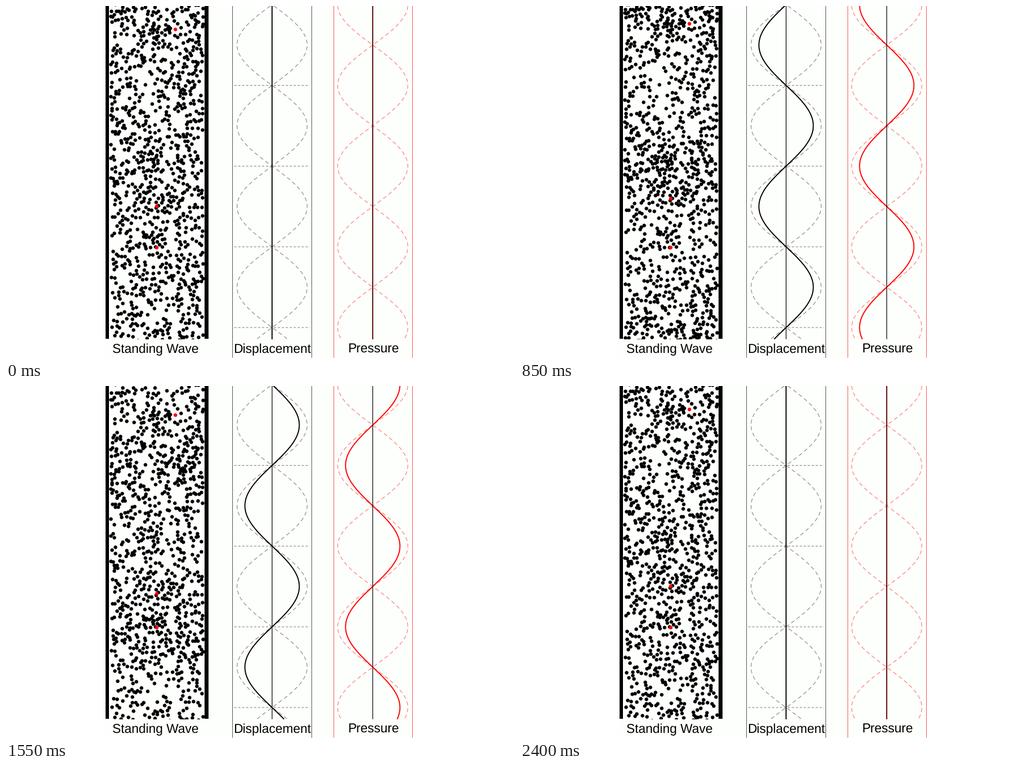
A matplotlib script for the animation above (2.45 s loop, 898 px wide and 623 px high).

```python
import matplotlib.pyplot as plt
import numpy as np
from matplotlib.animation import FuncAnimation
from matplotlib.patches import Rectangle

W, H, DPI = 898, 623, 64
PX = 72 / DPI                 # points per pixel
FRAMES, INTERVAL = 49, 50
PERIOD = 48                   # frames per oscillation

BOTTOM = 589                  # lower end of tube and graphs
HALF = 142.85                 # half a wavelength
NODE = 140.5                  # a displacement node
SWING = 16.2                  # largest particle shift
ENVELOPE, PEAK = 62, 60.6     # dashed and solid graph amplitudes
DISP_X, PRES_X = 470.4, 648.3
GREY, PINK, PAPER = "#777777", "#ff6464", "#fdfffc"

plt.rcParams["text.hinting"] = "none"
fig = plt.figure(figsize=(W / DPI, H / DPI), dpi=DPI, facecolor="white")
ax = fig.add_axes([0, 0, 1, 1])
ax.set_xlim(0, W)
ax.set_ylim(H, 0)
ax.axis("off")
window = Rectangle((0, 0), W, BOTTOM, transform=ax.transData)


def box(x, y, w, h, color):
    ax.add_patch(Rectangle((x, y), w, h, fc=color, lw=0))


def line(x, y, color, width, z):
    artist, = ax.plot(x, y, color=color, lw=width * PX, zorder=z, snap=False)
    return artist


def displacement(y):
    return np.sin(np.pi * (y - NODE) / HALF)


def pressure(y):
    return np.cos(np.pi * (y - NODE) / HALF)


def make_particles(count, gap=3.5):
    """Scatter rest positions over the tube, leaving a few sparse spots."""
    rng = np.random.default_rng(5)
    spots = [(290, 264, 12), (216, 346, 10), (205, 411, 10),
             (290, 405, 10), (205, 483, 11)]
    points = [(281, 42), (285, 40), (288, 43), (267, 408), (267, 417), (271, 422)]
    while len(points) < count:
        x, y = rng.uniform(184.5, 348), rng.uniform(-20, 610)
        sparse = any(np.hypot(x - a, y - b) < r for a, b, r in spots)
        nearest = np.hypot(*(np.array(points) - (x, y)).T).min()
        if not sparse and nearest > gap:
            points.append((x, y))
    return np.array(points)


def scatter(points, color, z):
    dots = ax.scatter(points[:, 0], points[:, 1], s=(6.4 * PX) ** 2,
                      c=color, linewidths=0, zorder=z)
    dots.set_clip_path(window)
    return dots


def graph(center, shape, envelope, edge, left, right):
    """Draw the fixed parts of one graph."""
    for x in (left + 0.5, right - 0.5):
        line([x, x], [0, H - 1], edge, 1, 2)
    line([center, center], [0, BOTTOM], "#111111", 1.3, 6)
    for sign in (-1, 1):
        curve = line(center + sign * ENVELOPE * shape(ys), ys, envelope, 1, 3)
        curve.set_dashes((7, 5))


ys = np.linspace(0, BOTTOM, 400)
box(173, 0, 546, H, PAPER)

# tube
box(176, 0, 5.5, BOTTOM, "black")
box(351, 0, 7, BOTTOM, "black")
particles = make_particles(1070)
tracers = np.array([(298.5, 41), (266.3, 354.3), (266.3, 427)])
groups = [(particles, scatter(particles, "black", 2)),
          (tracers, scatter(tracers, "red", 3))]

# graphs
graph(DISP_X, displacement, GREY, "#555555", 400, 541)
graph(PRES_X, pressure, PINK, "#ff5555", 579, 719)
for k in range(4):
    y = NODE + k * HALF
    line([403.5, 537], [y, y], GREY, 1, 3).set_dashes((4, 3))
disp_wave = line(DISP_X + 0 * ys, ys, "black", 1.9, 5)
pres_wave = line(PRES_X + 0 * ys, ys, "red", 1.9, 5)

for x, label in ((264.2, "Standing Wave"), (470.2, "Displacement"), (649.7, "Pressure")):
    ax.text(x, 614, label, family="Liberation Sans", fontsize=22.6 * PX,
            ha="center", va="baseline", color="black")


def update(i):
    s = np.sin(2 * np.pi * i / PERIOD)
    for rest, dots in groups:
        x, y = rest.T
        dots.set_offsets(np.column_stack([x, y + SWING * s * displacement(y)]))
    disp_wave.set_xdata(DISP_X + PEAK * s * displacement(ys))
    pres_wave.set_xdata(PRES_X + PEAK * s * pressure(ys))
    return [dots for _, dots in groups] + [disp_wave, pres_wave]


anim = FuncAnimation(fig, update, frames=FRAMES, interval=INTERVAL,
                     repeat=True, repeat_delay=0, blit=False)
plt.show()
```
